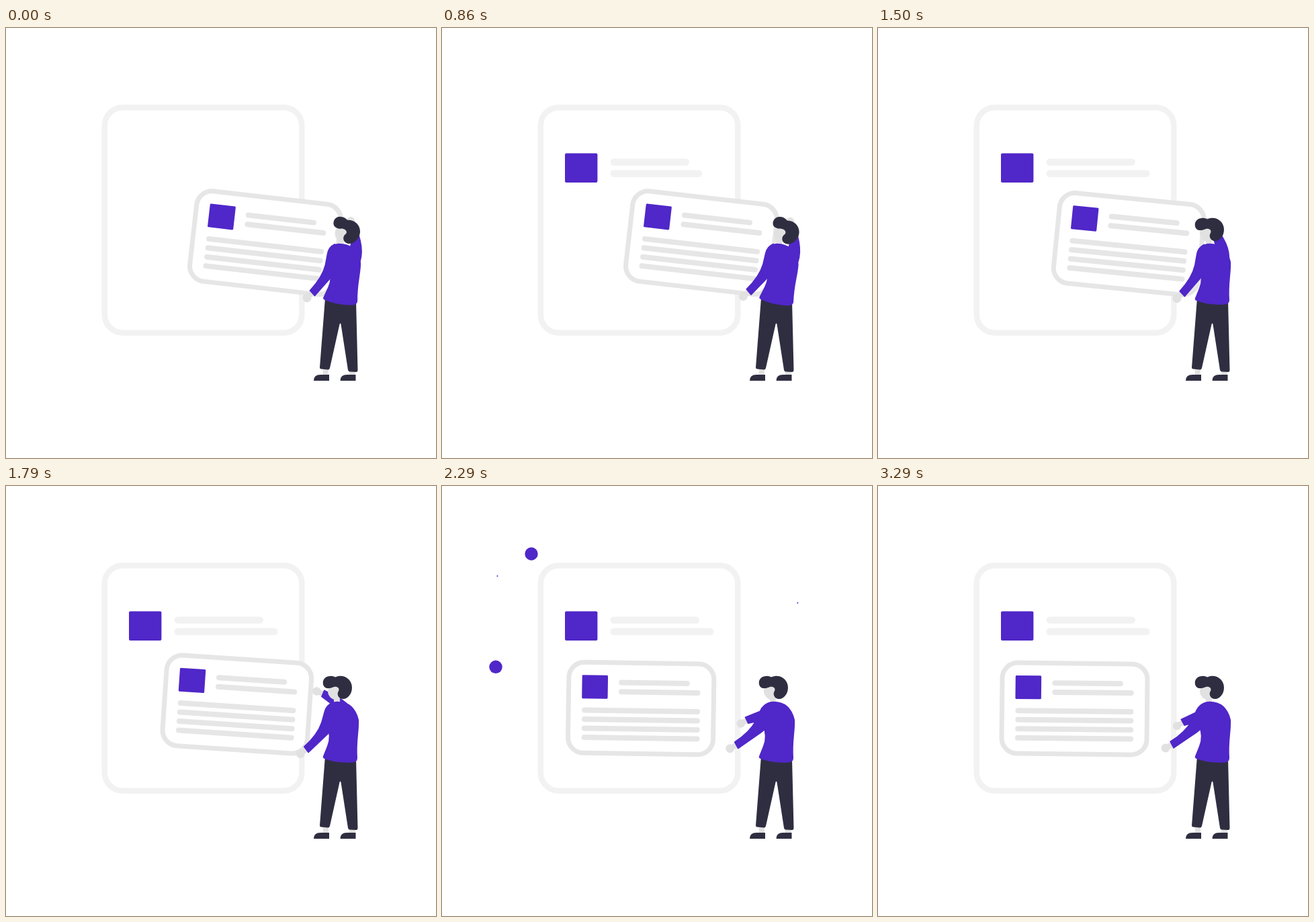
Animation of 640 by 640 pixels, one loop 3870 ms. Source, as an HTML page with a canvas:

```html
<!DOCTYPE html>
<html lang="en">
<head>
<meta charset="utf-8">
<title>Placing a card</title>
<style>
html, body { margin: 0; width: 100%; height: 100%; overflow: hidden; background: #fff; }
canvas { display: block; width: 640px; height: 640px; }
</style>
</head>
<body>
<canvas id="stage" width="640" height="640"></canvas>
<script>
const ctx = document.getElementById('stage').getContext('2d');
const LOOP = 3870, FPS = 14;
const PURPLE = '#5027c8', DARK = '#2f2e41', SKIN = '#e1e1e1';
const PALE = '#f2f2f2', LINE = '#e6e6e6', GREY = '#cbcbcb';

// x, y, start time, colour of each popping dot
const POP = 430, DOT_R = 10.5;
const dots = [
  [109.5, 125, 1785, GREY], [485.8, 209.3, 1785, GREY],
  [133, 101, 2107, PURPLE], [80, 269.3, 2107, PURPLE],
  [82.5, 134, 2245, PURPLE], [529.3, 174, 2245, PURPLE],
  [65.5, 292.5, 2640, PURPLE], [550.5, 210.5, 2860, PURPLE]
];

const shape = {
  farSleeve: 'M-48 -28.5 L-26 -27 Q-8 -25 3 -17 L6 0 L-10 4 Q-18 -12 -32 -14.5 L-48 -18.5 Z',
  nearSleeve: 'M435 380.5 Q458 366 467 349 L474 334 Q478 325 488 323 L497 340 Q487 358 474 367 L440 390 Z',
  shirt: 'M490 321 Q518 319 525 348 Q525.5 355 524 370 Q522 390 523 405 Q523 411 515 411.5 ' +
    'Q492 413 473 405.5 Q471 404 472 402 L478 387 Q484 372 477 357 L476 333 Q480 322 490 321 Z',
  hair: 'M478 301 C470 300 469 286 479 283.5 C484 282 487 283 490 284.5 C503 279 515 288 515 300 ' +
    'C515 310 508 317 502 317 C494 317 492 309 495 305 C497 301 493 298 488 299 C485 300 483 301.5 478 301 Z',
  trousers: 'M475 402 L521 406 L523.5 509 Q523.5 512 521 512 L512 511.5 Q509.5 511.5 509 509 L498.5 441 ' +
    'Q497.5 438 496.5 441 L482 506 Q481 509 479 508.5 L469 507.5 Q467 507.5 467 505 Z',
  shoe: 'M0 9 Q0 0 10 0 L23 0 L23 9 Z'
};
for (const k in shape) shape[k] = new Path2D(shape[k]);

const mix = (a, b, p) => a + (b - a) * p;

function ease(t, start, end) {
  const u = Math.min(1, Math.max(0, (t - start) / (end - start)));
  return u * u * (3 - 2 * u);
}

function fill(path, color, round) {
  ctx.fillStyle = color;
  ctx.fill(path);
  if (!round) return;
  ctx.strokeStyle = color;
  ctx.lineWidth = round;
  ctx.lineJoin = 'round';
  ctx.stroke(path);
}

function box(x, y, w, h, r, color, edge) {
  if (w <= 0 || h <= 0) return;
  ctx.beginPath();
  ctx.roundRect(x, y, w, h, r);
  ctx.fillStyle = color;
  ctx.fill();
  if (!edge) return;
  ctx.strokeStyle = edge[0];
  ctx.lineWidth = edge[1];
  ctx.stroke();
}

function bar(x, y, w, h, color) {
  box(x, y - h / 2, w, h, h / 2, color);
}

function disc(x, y, r, color) {
  ctx.beginPath();
  ctx.arc(x, y, r, 0, 7);
  ctx.fillStyle = color;
  ctx.fill();
}

function limb(x1, y1, x2, y2, w) {
  ctx.beginPath();
  ctx.moveTo(x1, y1);
  ctx.lineTo(x2, y2);
  ctx.strokeStyle = SKIN;
  ctx.lineWidth = w;
  ctx.stroke();
}

function turn(x, y, deg, draw) {
  ctx.save();
  ctx.translate(x, y);
  ctx.rotate(deg * Math.PI / 180);
  ctx.translate(-x, -y);
  draw();
  ctx.restore();
}

function drawPanel(t) {
  box(146.8, 118.2, 293.5, 335.5, 27, '#fff', [PALE, 8.5]);
  const s = ease(t, 0, 430);
  box(207.2 - 24.2 * s, 208.2 - 21.7 * s, 48.4 * s, 43.4 * s, 2 * s, PURPLE);
  const g = ease(t, 430, 970);
  bar(250.5, 199.6, 132.5 * g, 10.4, PALE);
  bar(250.5, 216.8, 154 * g, 10.4, PALE);
}

function drawCard(p) {
  ctx.save();
  ctx.translate(mix(386, 292.5, p), mix(319.7, 331.5, p));
  ctx.rotate(mix(6.5, 0.6, p) * Math.PI / 180);
  box(-108, -67.5, 216, 135, 23, '#fff', [LINE, 7]);
  box(-88.2, -48.6, 38.4, 35, 1.5, PURPLE);
  bar(-33.5, -38, 105.5, 8, LINE);
  bar(-33.5, -24.3, 121.5, 8, LINE);
  for (let i = 0; i < 4; i++) bar(-88, 3.7 + 13.5 * i, 176, 8, LINE);
  ctx.restore();
}

function drawFarArm(q) {
  ctx.save();
  ctx.translate(507, 349);
  ctx.rotate((158.4 - mix(90.4, 187.5, q)) * Math.PI / 180);
  disc(-58, -23, 6.2, SKIN);
  limb(-57, -23, -46, -23, 8);
  fill(shape.farSleeve, PURPLE, 1.5);
  ctx.restore();
}

function drawHead() {
  limb(491, 306, 493, 324, 9);
  ctx.beginPath();
  ctx.ellipse(491, 305, 12, 13, 0, 0, 7);
  ctx.fillStyle = SKIN;
  ctx.fill();
  fill(shape.hair, DARK);
}

function drawNearArm() {
  disc(428, 390, 6.5, SKIN);
  limb(428, 389.5, 438, 385, 8);
  fill(shape.nearSleeve, PURPLE, 1.5);
}

function drawPerson(t, p) {
  limb(476, 505, 475.5, 518, 8);
  limb(515, 508, 515.5, 518, 9);
  for (const x of [458, 497.5]) {
    ctx.save();
    ctx.translate(x, 516);
    fill(shape.shoe, DARK);
    ctx.restore();
  }
  fill(shape.trousers, DARK);

  const back = ease(t, 950, 1430);
  const lean = mix(3 + 3 * ease(t, 590, 950), 0, back);
  turn(497, 408, lean, () => {
    drawFarArm(ease(t, 1205, 2420));
    turn(493, 322, mix(18, 0, back), drawHead);
    fill(shape.shirt, PURPLE);
    turn(484, 333, mix(-17.5, 0, p), drawNearArm);
  });
}

function drawDots(t) {
  for (const [x, y, start, color] of dots) {
    const u = (t - start) / POP;
    if (u <= 0 || u >= 1) continue;
    disc(x, y, DOT_R * ease(Math.min(u, 1 - u), 0, 0.5), color);
  }
}

function draw(t) {
  ctx.fillStyle = '#fff';
  ctx.fillRect(0, 0, 640, 640);
  const p = ease(t, 1220, 2430);
  drawPanel(t);
  drawCard(p);
  drawPerson(t, p);
  drawDots(t);
}

const begin = performance.now();
function tick() {
  const t = (performance.now() - begin) % LOOP;
  draw(Math.floor((t + 4) * FPS / 1000) * 1000 / FPS);
  requestAnimationFrame(tick);
}
tick();
</script>
</body>
</html>
```
